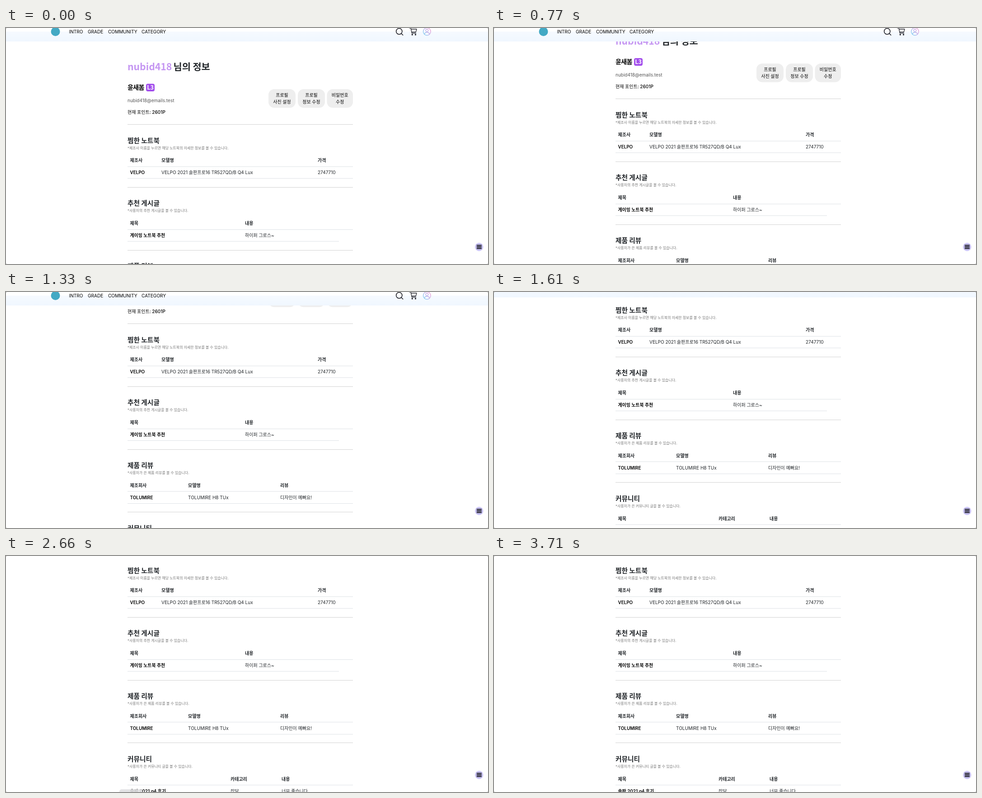
An HTML page with a canvas that plays this animation: 1067x525 px, repeating every 3.78 s.

```html
<!DOCTYPE html>
<html lang="ko">
<head>
<meta charset="utf-8">
<title>내 정보</title>
<style>
html, body { margin: 0; width: 100%; height: 100%; overflow: hidden; background: #fff; }
canvas { display: block; width: 1067px; height: 525px; }
</style>
</head>
<body>
<canvas id="stage"></canvas>
<script>
const W = 1067, H = 525, LOOP = 3780, TICK = 70;
const LEFT = 269, RIGHT = 768;
const HEADING = '"Noto Sans CJK KR", "Noto Sans CJK", sans-serif';
const BODY = 'Inter, "Noto Sans CJK KR", "Noto Sans CJK", sans-serif';
const INK = '#212529';

const canvas = document.getElementById('stage');
const ctx = canvas.getContext('2d');
const ratio = window.devicePixelRatio || 1;
canvas.width = Math.round(W * ratio);
canvas.height = Math.round(H * ratio);

// Two wheel gestures: start time and the page offset after each tick.
const gestures = [
  { start: 630, offsets: [7.7, 30, 57, 82, 97, 104] },
  { start: 1190, offsets: [111.7, 126, 144, 163, 182, 198, 210.3, 218] }
];

const sections = [
  { title: '찜한 노트북', note: '*제조사 이름을 누르면 해당 노트북의 자세한 정보를 볼 수 있습니다.',
    cols: [274.5, 344, 690], head: ['제조사', '모델명', '가격'],
    row: ['VELPO', 'VELPO 2021 솔판프로16 TR527QD/B Q4 Lux', '2747710'], rowEnd: RIGHT },
  { title: '추천 게시글', note: '*사용자의 추천 게시글을 볼 수 있습니다.',
    cols: [274.5, 529], head: ['제목', '내용'],
    row: ['게이밍 노트북 추천', '하이퍼 그로스~'], rowEnd: 737 },
  { title: '제품 리뷰', note: '*사용자가 쓴 제품 리뷰를 볼 수 있습니다.',
    cols: [274.5, 403, 607], head: ['제조회사', '모델명', '리뷰'],
    row: ['TOLUMIRE', 'TOLUMIRE H8 TUx', '디자인이 예뻐요!'], rowEnd: RIGHT },
  { title: '커뮤니티', note: '*사용자가 쓴 커뮤니티 글을 볼 수 있습니다.',
    cols: [274.5, 497, 610], head: ['제목', '카테고리', '내용'],
    row: ['솔판 2021 q4 후기', '잡담', '너무 좋습니다'], rowEnd: RIGHT }
];

const buttons = [
  { x: 581, w: 60, lines: ['프로필', '사진 설정'] },
  { x: 646, w: 60, lines: ['프로필', '정보 수정'] },
  { x: 710.5, w: 57.5, lines: ['비밀번호', '수정'] }
];

function text(str, x, y, { size = 10, weight = 400, color = INK, family = BODY, align = 'left', spacing = 0 } = {}) {
  ctx.font = `${weight} ${size}px ${family}`;
  ctx.letterSpacing = spacing + 'px';
  ctx.textAlign = align;
  ctx.fillStyle = color;
  ctx.fillText(str, x, y);
}

function box(x, y, w, h, radius, color) {
  ctx.fillStyle = color;
  ctx.beginPath();
  ctx.roundRect(x, y, w, h, radius);
  ctx.fill();
}

function disc(x, y, r, color) {
  ctx.fillStyle = color;
  ctx.beginPath();
  ctx.arc(x, y, r, 0, Math.PI * 2);
  ctx.fill();
}

function rule(y, end, color) {
  ctx.fillStyle = color;
  ctx.fillRect(LEFT, Math.round(y - 0.5), end - LEFT, 1);
}

function stroke(path, color, width) {
  ctx.strokeStyle = color;
  ctx.lineWidth = width;
  ctx.lineCap = ctx.lineJoin = 'round';
  ctx.stroke(new Path2D(path));
}

function scrollAt(time) {
  let offset = 0;
  for (const { start, offsets } of gestures) {
    if (time < start) break;
    const step = Math.floor((time - start) / TICK);
    offset = offsets[Math.min(step, offsets.length - 1)];
  }
  return offset;
}

function headerShiftAt(time) {
  if (time < 1540) return 0;
  if (time < 1610) return 4;
  return time < 1680 ? 18 : 40;
}

function drawProfile() {
  const title = { weight: 700, family: HEADING };
  text('nubid418', LEFT, 93.5, { ...title, size: 21.2, color: '#c596f2' });
  text('님의 정보', 370.5, 93.5, { ...title, size: 20.8 });

  text('윤새봄', LEFT, 137, { size: 14, weight: 700, color: '#000', spacing: -0.6 });
  box(310, 124, 19, 17, 4, '#a34fec');
  text('L3', 319.5, 137.3, { size: 12.6, weight: 700, color: '#fff', family: HEADING, align: 'center' });
  text('nubid418@emails.test', LEFT, 165, { color: '#555' });
  text('현재 포인트: 2601P', LEFT, 191.2, { weight: 500, color: '#000' });

  for (const { x, w, lines } of buttons) {
    box(x, 136, w, 41.5, 13, '#eeeeee');
    lines.forEach((line, i) => text(line, x + w / 2, 152.7 + i * 15.7,
      { weight: 500, color: '#000', align: 'center' }));
  }
}

function drawSection({ title, note, cols, head, row, rowEnd }, top) {
  rule(top, RIGHT, '#d2d2d2');
  text(title, LEFT, top + 41.2, { size: 14.7, weight: 700, family: HEADING });
  text(note, LEFT, top + 55.2, { size: 7.95, color: '#777' });
  cols.forEach((x, i) => {
    text(head[i], x, top + 83.9, { weight: 600 });
    text(row[i], x, top + 110.8, i ? {} : { size: 9.9, weight: 600, color: '#000' });
  });
  rule(top + 93.8, RIGHT, '#dee2e6');
  rule(top + 120.5, rowEnd, '#dee2e6');
}

function drawHeader() {
  ctx.fillStyle = '#fff';
  ctx.fillRect(0, 0, W, 8);
  const shade = ctx.createLinearGradient(0, 8, 0, 30);
  shade.addColorStop(0, '#f6faff');
  shade.addColorStop(1, '#f0f7ff');
  ctx.fillStyle = shade;
  ctx.fillRect(0, 8, W, 22);

  disc(109.5, 8, 10, '#43a9c4');
  [['INTRO', 139.5], ['GRADE', 181], ['COMMUNITY', 226], ['CATEGORY', 300]]
    .forEach(([label, x]) => text(label, x, 12.3, { size: 10.1, color: '#000' }));

  stroke('M863.7 7.4a6.6 6.6 0 1 0 13.2 0a6.6 6.6 0 1 0 -13.2 0M875.2 12.2L878.6 15.8', '#1b1b22', 1.6);
  stroke('M893 0H896L898.5 11.5H907.5M896.4 2.5H909L907.2 9H898', '#25252c', 1.3);
  disc(899.3, 14.8, 1.7, '#25252c');
  disc(906.5, 14.8, 1.7, '#25252c');

  const tint = ctx.createLinearGradient(924, 14, 940, 2);
  tint.addColorStop(0, '#69c9f0');
  tint.addColorStop(0.5, '#b6a2e6');
  tint.addColorStop(1, '#ee92cd');
  stroke('M923.6 8a8.3 8.3 0 1 0 16.6 0a8.3 8.3 0 1 0 -16.6 0M929.1 5.4a2.8 2.8 0 1 0 5.6 0a2.8 2.8 0 1 0 -5.6 0M926.7 13.5C927 8.3 936.8 8.3 937.1 13.5', tint, 1.2);
}

function drawMenuButton() {
  disc(1047.3, 487, 9.2, '#cbc5f6');
  for (const y of [483.5, 487, 490.5]) stroke(`M1042.6 ${y}H1052.2`, '#000', 1.8);
}

function drawLabels(time) {
  const color = 'rgba(224, 224, 226, 0.88)';
  if (time >= 2660 && time < 2800) box(251, 519, 51, 14, 5, color);
  if (time >= 2870 && time < 3080) box(108, 519, 66, 14, 5, color);
}

function drawCorners() {
  ctx.fillStyle = '#a5a5a5';
  ctx.beginPath();
  ctx.rect(0, 0, W, H);
  ctx.roundRect(0, 0, W, H, 2.5);
  ctx.fill('evenodd');
}

function draw(time) {
  ctx.setTransform(ratio, 0, 0, ratio, 0, 0);
  ctx.fillStyle = '#fff';
  ctx.fillRect(0, 0, W, H);

  ctx.save();
  ctx.translate(0, -Math.round(scrollAt(time)));
  drawProfile();
  sections.forEach((section, i) => drawSection(section, 214.4 + i * 139.8));
  ctx.restore();

  ctx.save();
  ctx.translate(0, -headerShiftAt(time));
  drawHeader();
  ctx.restore();

  drawMenuButton();
  drawLabels(time);
  drawCorners();
}

const origin = performance.now();
function loop() {
  draw((performance.now() - origin) % LOOP);
  requestAnimationFrame(loop);
}
loop();
</script>
</body>
</html>
```
